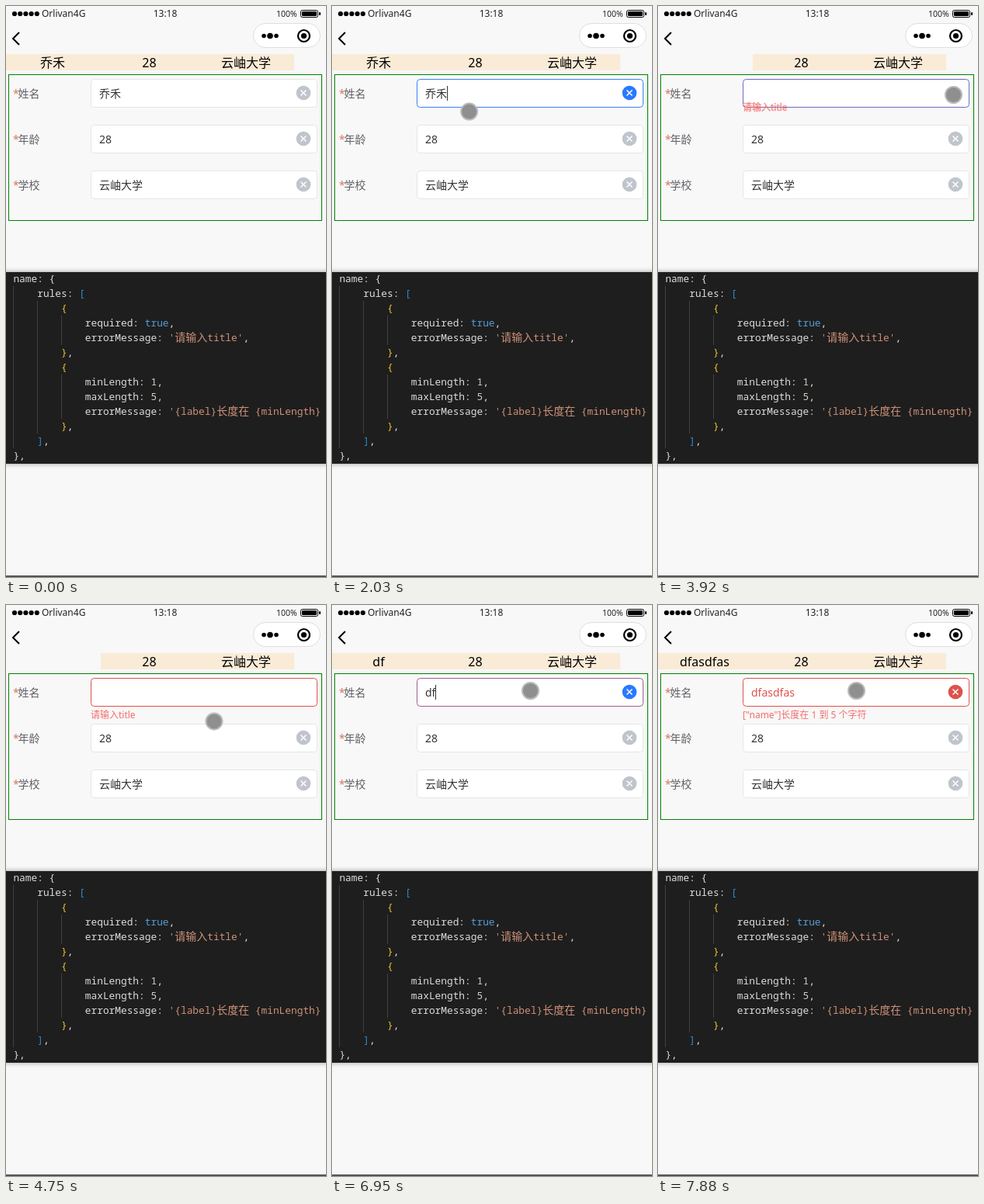
Recreate the animation shown at these times as an HTML page. Size 412 by 736 pixels, loop 8 s.

```html
<!DOCTYPE html>
<html lang="zh">
<head>
<meta charset="utf-8">
<style>
  html, body { margin: 0; width: 100%; height: 100%; overflow: hidden; background: #f8f8f8; }
  svg { display: block; width: 412px; height: 736px; }
  text { font: 14px "Noto Sans", "Noto Sans CJK SC", sans-serif; white-space: pre; }
  .mid { text-anchor: middle; }
  .head { font-size: 16px; text-anchor: middle; }
  .label { fill: #606266; }
  .star { fill: #d9755a; }
  .value { fill: #333; }
  .field { fill: #fff; stroke: #e5e5e5; }
  .code { font: 12.83px "Noto Sans Mono", "Noto Sans CJK SC", monospace; fill: #dcdcdc; }
  .cjk { font-size: 14px; }
  .square { fill: #2a8ccc; }
  .curly { fill: #f0c42c; }
  .bool { fill: #569cd6; }
  .string { fill: #ce9178; }
  .number { fill: #c8d6c0; }
</style>
</head>
<body>
<svg viewBox="0 0 412 736">
  <rect width="412" height="736" fill="#f8f8f8"/>

  <g id="dots"></g>
  <text x="46" y="13.5" style="font-size:12px" fill="#222">Orlivan4G</text>
  <text x="205" y="13.5" class="mid" style="font-size:12px" fill="#222">13:18</text>
  <text x="348" y="14" style="font-size:10.5px" fill="#222">100%</text>
  <rect x="379.5" y="5.5" width="22" height="9" rx="2" fill="none" stroke="#000"/>
  <rect x="381" y="7" width="19" height="6" rx="1"/>
  <rect x="403" y="8" width="2" height="4" rx="1"/>

  <path d="M17 34L9 42L17 50" fill="none" stroke="#000" stroke-width="2"/>
  <rect x="318.5" y="22.5" width="86" height="31" rx="15.5" fill="#fff" stroke="#dedede"/>
  <circle cx="332" cy="38.5" r="2.8"/><circle cx="340" cy="38.5" r="3.8"/><circle cx="348" cy="38.5" r="2.8"/>
  <circle cx="383.5" cy="38.5" r="7.5" fill="none" stroke="#000" stroke-width="2.2"/>
  <circle cx="383.5" cy="38.5" r="3.6"/>

  <rect x="122" y="62" width="249" height="21" fill="#faebd7"/>
  <g id="nameCell">
    <rect y="62" width="122" height="21" fill="#faebd7"/>
    <text id="nameHead" class="head" x="60" y="78.5"></text>
  </g>
  <text class="head" x="184.5" y="78.5">28</text>
  <text class="head" x="309" y="78.5">云岫大学</text>

  <rect x="3.5" y="88.5" width="403" height="188" fill="none" stroke="#008000"/>
  <g id="form"></g>
  <rect id="caret" y="103" width="1" height="19"/>
  <text id="error" x="109" y="146" style="font-size:12px" fill="#f56c6c"></text>

  <rect x="-6" y="343" width="424" height="247" fill="#1e1e1e" style="filter:drop-shadow(0 0 3px rgba(0,0,0,.4))"/>
  <path d="M9.5 361V570M40.5 380V551M71.5 399V437M71.5 475V532" stroke="#404040"/>
  <g id="code"></g>
  <rect y="734" width="412" height="2" fill="#555"/>

  <circle id="pointer" r="10.5" fill="#8f8f8f" stroke="#b9b9b9" stroke-width="2"/>
</svg>
<script>
const $ = id => document.getElementById(id);
const LOOP = 8000, BLINK = 530, SLIDE = 300;
const NAME = '乔禾', TYPED = 'dfasdfas';
const FOCUS = 1820, CLEAR = 3850, TYPE = 6880, TOO_LONG = 7190;
const GREY = [229, 229, 229], BLUE = [41, 121, 255], RED = [221, 82, 77];

const keyTimes = [TYPE, 6940, 7010, 7070, 7130, TOO_LONG, 7300, 7350];
const borderChanges = [[FOCUS, BLUE], [CLEAR, RED], [TYPE, BLUE], [TOO_LONG, RED]];

// time, x, y
const pointerPath = [
  [970, 350, 736], [1070, 347, 710], [1160, 310, 627], [1300, 225, 450],
  [1390, 192, 322], [1420, 189, 290], [1550, 176.5, 112],
  [2000, 176.5, 112], [2030, 176.5, 134.5], [2120, 190, 275], [2220, 215, 430],
  [2360, 215, 430], [2500, 271, 446], [2700, 240, 400], [2830, 226, 322],
  [2950, 230, 205], [3030, 232.5, 157.5], [3090, 233, 150],
  [3170, 233, 150], [3480, 393, 120], [3650, 380.5, 114.5],
  [3950, 380.5, 114.5], [4210, 268, 150],
  [4750, 268, 150], [4910, 263, 130], [5070, 255.5, 110.5]
];

const part = (kind, text) => `<tspan class="${kind}">${text}</tspan>`;
const open = part('curly', '{'), close = part('curly', '}') + ',';
const codeLines = [
  [0, 'name: {'],
  [4, 'rules: ' + part('square', '[')],
  [8, open],
  [12, `required: ${part('bool', 'true')},`],
  [12, `errorMessage: ${part('string', `'${part('cjk', '请输入')}title'`)},`],
  [8, close],
  [8, open],
  [12, `minLength: ${part('number', 1)},`],
  [12, `maxLength: ${part('number', 5)},`],
  [12, `errorMessage: ${part('string', `'{label}${part('cjk', '长度在')} {minLength}`)}`],
  [8, close],
  [4, part('square', ']') + ','],
  [0, '},']
];
$('code').innerHTML = codeLines.map(([column, html], i) =>
  `<text class="code" x="${9.4 + 7.7 * column}" y="${356 + 19 * i}">${html}</text>`).join('');

$('dots').innerHTML = [0, 1, 2, 3, 4].map(i =>
  `<circle cx="${11 + 7.2 * i}" cy="10" r="3.1"/>`).join('');

$('form').innerHTML = [['姓名', NAME], ['年龄', '28'], ['学校', '云岫大学']].map(([label, value], i) =>
  `<g transform="translate(0 ${59 * i})">
    <text class="star" x="9" y="118">*</text><text class="label" x="15.5" y="118">${label}</text>
    <rect class="field" x="109.5" y="94.5" width="291" height="36" rx="4"/>
    <text class="value" x="120" y="118">${value}</text>
    <g class="clear"><circle cx="383" cy="112" r="9.3" fill="#c0c4cc"/>
      <path d="M379.5 108.5l7 7m0-7l-7 7" stroke="#fff" stroke-width="1.5"/></g>
  </g>`).join('');

const field = document.querySelector('.field');
const value = document.querySelector('.value');
const clear = document.querySelector('.clear');
const clearDisc = clear.querySelector('circle');

const rgb = c => `rgb(${c.map(Math.round)})`;
const mix = (a, b, k) => a.map((v, i) => v + (b[i] - v) * k);
const show = (node, on) => node.setAttribute('visibility', on ? 'visible' : 'hidden');

// CSS "ease" curve, solved by bisection
function ease(x) {
  if (x >= 1) return 1;
  let low = 0, high = 1, s;
  for (let i = 0; i < 20; i++) {
    s = (low + high) / 2;
    if (.75 * s * (1 - s) + s ** 3 < x) low = s; else high = s;
  }
  return .3 * s * (1 - s) ** 2 + 3 * s * s * (1 - s) + s ** 3;
}

function pointerAt(t) {
  const next = pointerPath.findIndex(p => p[0] > t);
  if (next < 0) return pointerPath.at(-1);
  const a = pointerPath[next - 1], b = pointerPath[next];
  return mix(a, b, (t - a[0]) / (b[0] - a[0]));
}

function caretOn(t) {
  if (t >= TYPE) return t < keyTimes.at(-1) + BLINK;
  if (t >= CLEAR) return t >= 5270 && Math.floor((t - 5270) / BLINK) % 2 === 0;
  return t >= FOCUS && Math.floor((t - FOCUS) / BLINK) % 2 === 0;
}

function draw(t) {
  const name = t < CLEAR ? NAME : TYPED.slice(0, keyTimes.filter(k => k <= t).length);
  const tooLong = t >= TOO_LONG;
  const failed = tooLong || (t >= CLEAR && t < TYPE);

  value.textContent = $('nameHead').textContent = name;
  value.style.fill = failed ? rgb(RED) : '#333';
  show($('nameCell'), name);
  show(clear, name);
  clearDisc.setAttribute('fill', t < FOCUS ? '#c0c4cc' : rgb(failed ? RED : BLUE));

  let border = GREY;
  for (const [start, color] of borderChanges)
    if (t >= start) border = mix(border, color, ease((t - start) / SLIDE));
  field.style.stroke = rgb(border);

  const slide = ease(Math.max(0, t - (tooLong ? TOO_LONG : CLEAR)) / SLIDE);
  const error = $('error');
  show(error, failed);
  error.textContent = tooLong ? '["name"]长度在 1 到 5 个字符' : '请输入title';
  error.setAttribute('transform', `translate(0 ${-17 * (1 - slide)})`);
  error.setAttribute('opacity', slide < 1 ? .8 : 1);
  error.setAttribute('stroke', slide < 1 ? '#f56c6c' : 'none');
  error.setAttribute('stroke-width', .4);

  show($('caret'), caretOn(t));
  $('caret').setAttribute('x', 120 + (name ? Math.round(value.getComputedTextLength()) : 0));
  $('caret').setAttribute('fill', failed && name ? rgb(RED) : '#333');

  const visible = t >= pointerPath[0][0];
  show($('pointer'), visible);
  if (visible) {
    const [, x, y] = pointerAt(t);
    $('pointer').setAttribute('transform', `translate(${x} ${y})`);
  }
}

const begin = performance.now();
function tick() {
  draw((performance.now() - begin) % LOOP);
  requestAnimationFrame(tick);
}
tick();
</script>
</body>
</html>
```
